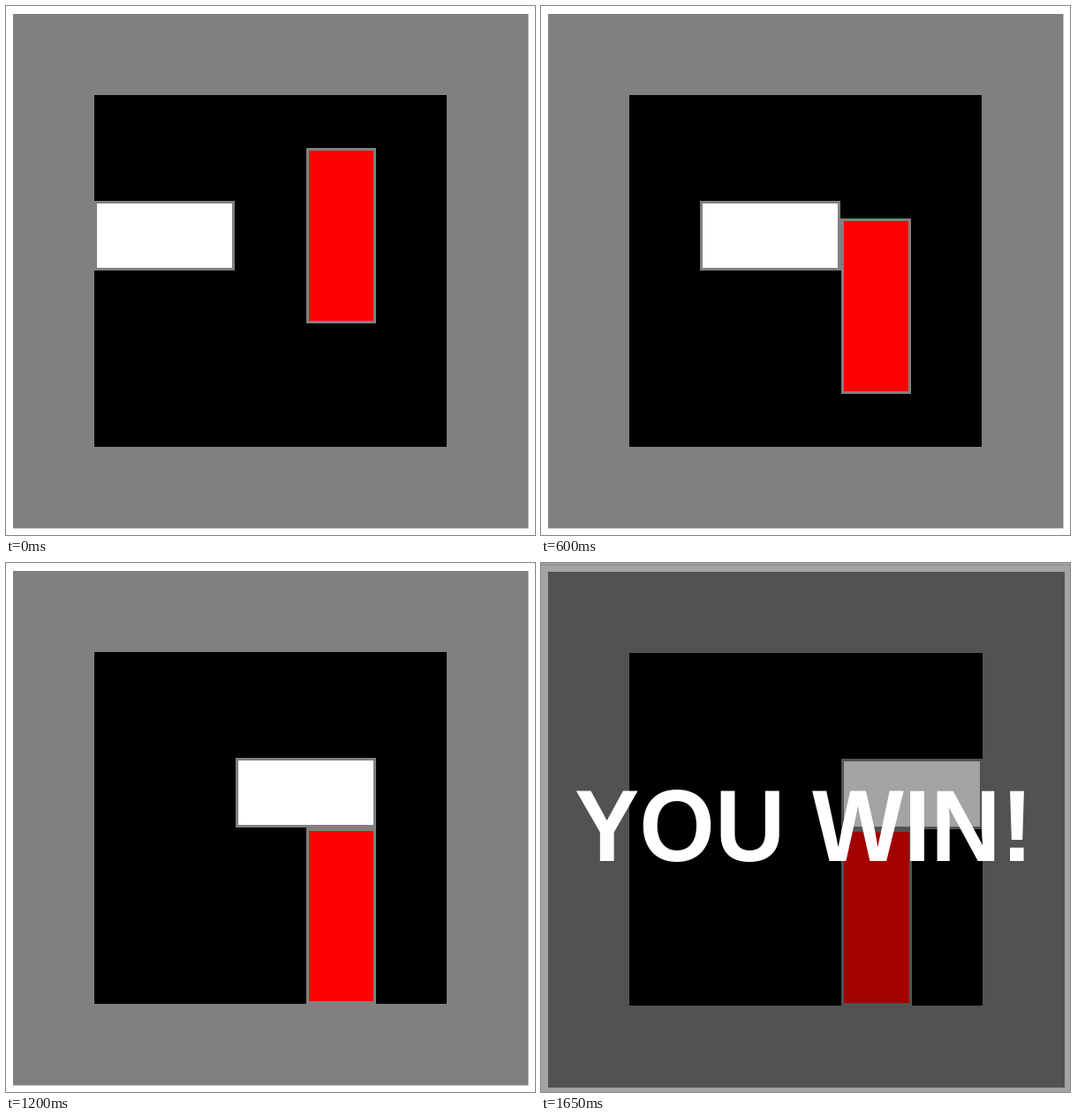
An HTML page that plays this animation: 599 by 600 pixels, repeating every 2100 ms.

```html
<!DOCTYPE html>
<html lang="en">
<head>
<meta charset="utf-8">
<title>Sliding block puzzle</title>
<style>
  html, body { margin: 0; width: 100%; height: 100%; overflow: hidden; background: #fff; }
  svg { display: block; width: 100%; height: 100%; }
  text { font: bold 110px "Liberation Sans", Arial, sans-serif; font-kerning: none; fill: #fff; }
</style>
</head>
<body>
<svg viewBox="0 0 599 600">
  <rect width="599" height="600" fill="#fff"/>
  <rect id="wall" fill="#808080"/>
  <rect id="floor"/>
  <g id="seams" fill="#808080">
    <rect id="sideSeam"/>
    <rect id="topSeam"/>
  </g>
  <g stroke="#808080" stroke-width="3">
    <rect id="red" fill="#f00"/>
    <rect id="white" fill="#fff"/>
  </g>
  <g id="win">
    <rect width="599" height="600" fill-opacity=".36"/>
    <rect y="2" width="599" height="1" fill="#8e8e8e"/>
    <text transform="translate(38 338) scale(1 1.045)">YOU WIN!</text>
  </g>
</svg>
<script>
const LOOP = 2100, STEP = 150, WIN = 11;
const $ = id => document.getElementById(id);
const clamp = (v, lo, hi) => Math.min(hi, Math.max(lo, v));

function box(id, x, y, width, height) {
  const attrs = { x, y, width: Math.max(0, width), height: Math.max(0, height) };
  for (const k in attrs) $(id).setAttribute(k, attrs[k]);
}

// Outline lies inside the given bounds.
const block = (id, x, y, w, h) => box(id, x + 1.5, y + 1.5, w - 3, h - 3);

function draw(t) {
  const step = Math.min(WIN, Math.floor((t % LOOP) / STEP));
  const won = step === WIN;
  $("win").style.display = won ? "" : "none";
  $("seams").style.display = won ? "none" : "";

  if (won) {
    box("wall", 8, 10, 585, 585);
    box("floor", 100, 102, 400, 400);
    block("white", 340, 222, 160, 80);
    block("red", 340, 302, 80, 200);
    return;
  }

  // White moves right, waits for red to drop, then moves on to the exit.
  const moves = clamp(step, 0, 2) + clamp(step - 6, 0, 4);
  const x = 100 + 40 * moves;
  const y = Math.min(301, 161 + 40 * clamp(step - 2, 0, 4));

  box("wall", 8, 9, 583.5, 583.5);
  box("floor", 100, 101, 399, 399);
  block("white", x, 221, 159, 79);
  block("red", 340, y, 79, 199);

  // Touching blocks share a solid edge.
  const top = Math.max(221, y);
  box("sideSeam", 339, top, x === 180 ? 1 : 0, 300 - top);
  box("topSeam", 340, 300, Math.min(419, x + 159) - 340, y === 301 ? 1 : 0);
}

let start;
function tick(now) {
  start ??= now;
  draw(now - start);
  requestAnimationFrame(tick);
}
draw(0);
requestAnimationFrame(tick);
</script>
</body>
</html>
```
